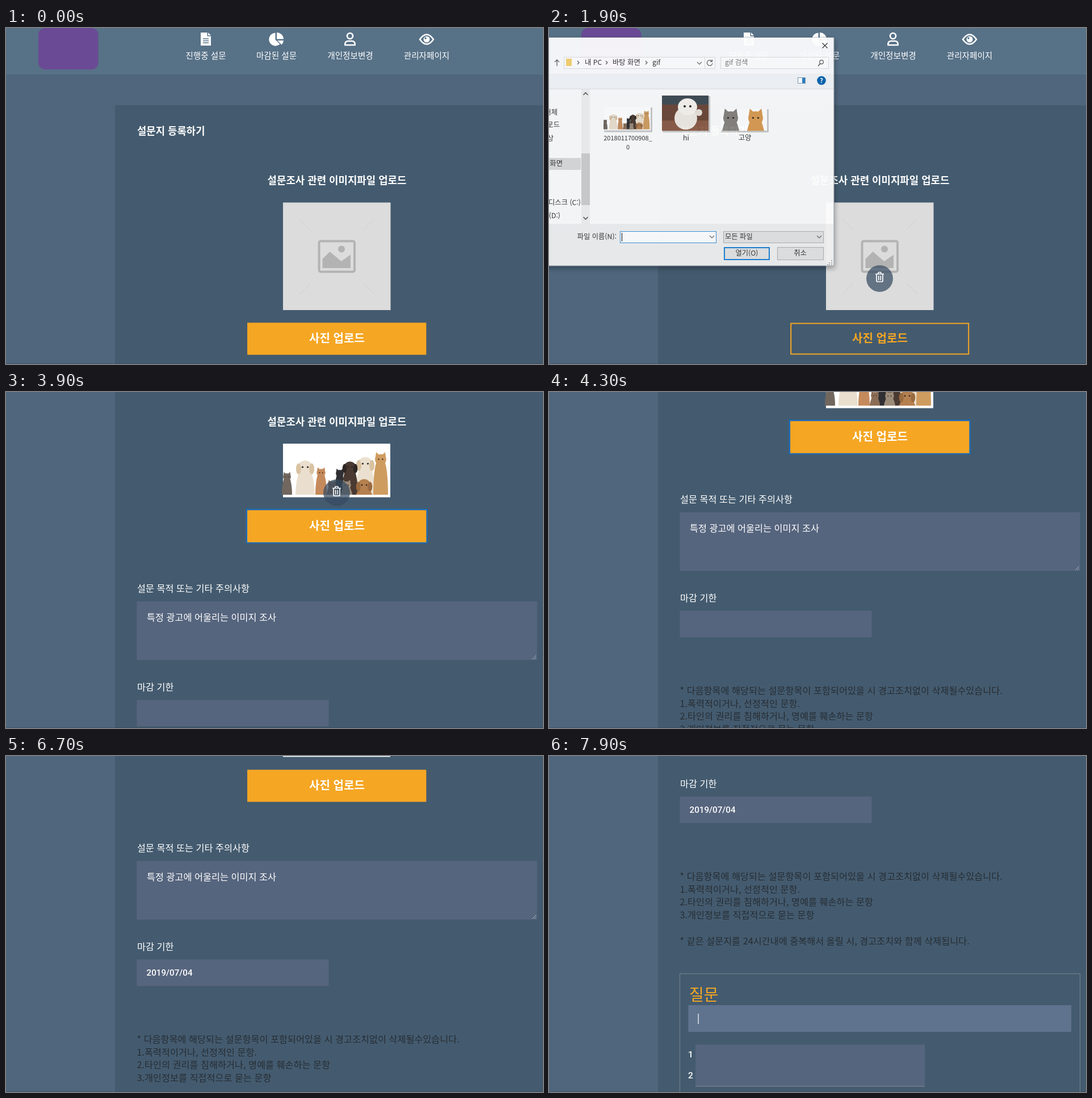
An HTML page that plays this animation: 946 by 592 pixels, repeating every 8000 ms.

```html
<!DOCTYPE html>
<html lang="ko">
<head>
<meta charset="utf-8">
<title>설문지 등록하기</title>
<style>
html, body { margin: 0; width: 100%; height: 100%; overflow: hidden; background: #4f667d; }
svg { display: block; width: 100vw; height: 100vh; }
text { font-family: "Noto Sans CJK KR", "Noto Sans CJK", sans-serif; }
.num { font-family: Roboto, "Noto Sans CJK KR", sans-serif; }
</style>
</head>
<body>
<svg id="stage" viewBox="0 0 946 592" xmlns="http://www.w3.org/2000/svg"></svg>
<script>
const LOOP = 8000, STEP = 100;
const ORANGE = '#f5a623', FIELD = '#56657e', FOCUS = '#60738e';

// Drawing helpers; text is placed by its vertical centre.
const rect = (x, y, w, h, fill, more = '') =>
  `<rect x="${x}" y="${y}" width="${w}" height="${h}" fill="${fill}" ${more}/>`;
const path = (d, fill, more = '') => `<path d="${d}" fill="${fill}" ${more}/>`;
const line = (d, color, width = 1, more = '') =>
  path(d, 'none', `stroke="${color}" stroke-width="${width}" ${more}`);
const oval = (x, y, rx, ry, fill) => `<ellipse cx="${x}" cy="${y}" rx="${rx}" ry="${ry}" fill="${fill}"/>`;
const text = (x, y, size, str, fill = '#fff', more = '') =>
  `<text x="${x}" y="${y + size * 0.365}" font-size="${size}" fill="${fill}" ${more}>${str}</text>`;
const group = (id, body, more = '') => `<g id="${id}" ${more}>${body}</g>`;
const MID = 'text-anchor="middle"', BOLD = 'font-weight="700"', NUM = 'class="num"';

// Sitting animal: pointed ears for cats, hanging ears for dogs.
function pet(x, top, w, color, earColor) {
  const r = w * 0.38, y = top + r;
  const ears = earColor
    ? oval(x - r * 0.9, y + r * 0.2, r * 0.35, r * 0.75, earColor) + oval(x + r * 0.9, y + r * 0.2, r * 0.35, r * 0.75, earColor)
    : path(`M${x - r} ${y}l${r * 0.2} ${-r * 1.3} ${r * 0.8} ${r * 0.7} ${r * 0.8} ${-r * 0.7} ${r * 0.2} ${r * 1.3}z`, color);
  return path(`M${x - r * 0.6} ${y}h${r * 1.2}Q${x + w / 2} ${top + w} ${x + w / 2} 90H${x - w / 2}Q${x - w / 2} ${top + w} ${x - r * 0.6} ${y}z`, color) +
    oval(x, y, r, r * 0.95, color) + ears +
    oval(x - r * 0.35, y - r * 0.05, r * 0.12, r * 0.12, '#2b2522') + oval(x + r * 0.35, y - r * 0.05, r * 0.12, r * 0.12, '#2b2522');
}

function petPhoto() {
  const pets = [
    [7, 52, 18, '#71675f'], [39, 29, 34, '#eadfce', '#d9c3a2'], [67, 44, 20, '#c58a5c'],
    [100, 46, 18, '#303034'], [145, 23, 34, '#ebe0cf', '#d8c29f'], [118, 31, 28, '#4a3a31', '#2e2623'],
    [172, 18, 26, '#cf9c60'], [86, 66, 18, '#8b6d55'], [112, 66, 20, '#9b8b79'], [143, 62, 30, '#b5804f', '#9a6a40']
  ];
  return rect(0, 0, 189, 94.5, '#fff') + pets.map(p => pet(...p)).join('');
}

function navBar() {
  const items = [[352, '진행중 설문'], [476.5, '마감된 설문'], [606.5, '개인정보변경'], [741, '관리자페이지']];
  return rect(0, 0, 946, 82, '#577187') +
    rect(57, 0, 105.5, 73, '#6a4a94', 'rx="12"') +
    items.map(([x, s]) => text(x, 48.5, 14.6, s, '#fff', MID)).join('') +
    path('M343 8h11.500v6.500h6.500V31H343z M356 8l5 5h-5z', '#fff') +
    line('M347 19h10M347 22.500h10M347 26h10', '#577187', 1.5) +
    path('M474.500 8.500a11.500 11.500 0 1 0 8 20l-8-8z M477 8a12 12 0 0 1 12 11.500h-12z M478 22h11a11 11 0 0 1-3.500 7.500z', '#fff') +
    `<circle cx="606" cy="14" r="5" fill="none" stroke="#fff" stroke-width="2.600"/>` +
    line('M597.300 30v-2q.5-5 5.500-5h6.400q5 0 5.500 5v2z', '#fff', 2.6, 'stroke-linejoin="round"') +
    line('M729 20q12-17 24 0q-12 17-24 0z', '#fff', 2.6, 'stroke-linejoin="round"') +
    oval(741, 20, 5.5, 5.5, '#fff') + oval(739, 18, 1.8, 1.8, '#577187');
}

function placeholder() {
  return rect(488, 307.5, 189.5, 189.5, '#dcdcdc') +
    line('M517 337l20 20M648 337l-18 18M517 469l18-18M650 469l-20-18', '#cfcfcf') +
    rect(551.5, 375.5, 62.5, 54, 'none', 'rx="3" stroke="#b3b3b3" stroke-width="4"') +
    oval(591, 389.5, 6, 6, '#b3b3b3') +
    path('M557.500 423v-16l13-13 20 17 16.500-11.500V423z', '#b3b3b3');
}

function trash() {
  return `<circle cx="582.500" cy="441.500" r="23.500" fill="rgba(55,75,98,.72)"/>` +
    line('M575 433.500h15M579.500 433l1-2.500h4l1 2.500M577 434v11q0 2 2 2h7q2 0 2-2v-11M580.700 436.500v8M584.300 436.500v8', '#fff', 1.7);
}

function uploadButton() {
  const label = fill => text(583, 546.5, 20.1, '사진 업로드', fill, `${MID} ${BOLD}`);
  return group('ring', rect(424, 518, 317.5, 58.5, 'none', 'stroke="#1a6dbd" stroke-width="2.500"')) +
    rect(426.2, 520.5, 313, 54, '#445b6f', `stroke="${ORANGE}" stroke-width="2"`) + label(ORANGE) +
    group('fill', rect(425.2, 519.5, 315, 56, ORANGE) + label('#fff'));
}

function calendar() {
  const colX = c => 251.5 + 32.7 * c, rowY = r => 903 + 30.2 * r;
  const cell = (id, c, r, fill) => group(id, rect(colX(c) - 16.5, rowY(r) - 15.5, 33, 30, fill, 'rx="4"'));
  let s = path('M236 818l10-9 10 9z', '#fff') + rect(230, 817, 238, 244, '#fff', 'rx="4"') +
    line('M230 856.500h238', '#ececec') +
    line('M252 833l-5 5 5 5M447 833l5 5-5 5', '#9c9c9c', 2) +
    text(349.5, 837, 14.3, '7월, <tspan fill="#9c9c9c">2019</tspan>', '#4a4a4a', `${MID} ${NUM}`) +
    cell('cell3', 3, 0, '#f8f8f8') + cell('cell11', 4, 1, '#f0f0f0') +
    cell('cell4', 4, 0, '#f0f0f0') + cell('picked', 4, 0, '#5cc4ef');
  [...'일월화수목금토'].forEach((d, i) => s += text(colX(i), 876, 10.5, d, '#ff9a19', MID));
  for (let i = 0; i < 35; i++) {
    const inside = i > 0 && i < 32, day = i === 0 ? 30 : i > 31 ? i - 31 : i;
    s += text(colX(i % 7), rowY(Math.floor(i / 7)), 14, day, inside ? '#4a4a4a' : '#dedede',
      `${MID} ${NUM} ${i === 4 ? 'id="day4"' : ''}`);
  }
  return group('calendar', s);
}

function form() {
  const rules = ['* 다음항목에 해당되는 설문항목이 포함되어있을 시 경고조치없이 삭제될수있습니다.',
    '1.폭력적이거나, 선정적인 문항.', '2.타인의 권리를 침해하거나, 명예를 훼손하는 문항',
    '3.개인정보를 직접적으로 묻는 문항', '', '* 같은 설문지를 24시간내에 중복해서 올릴 시, 경고조치와 함께 삭제됩니다.'];
  const answer = (n, y) => text(249.5, y + 17, 15.5, n, '#fff', `${MID} ${NUM} font-weight="500"`) +
    rect(258, y, 404, 36.5, FIELD) + rect(258, y + 36.5, 404, 1, '#858f9c');
  return text(231, 562, 16.3, '설문 목적 또는 기타 주의사항') +
    rect(230.500, 585, 705, 103, FIELD) +
    line('M927 687l7-7M931 687l3-3', '#aab2be') +
    text(248, 613, 16.3, '특정 광고에 어울리는 이미지 조사') +
    text(231, 736.5, 16.3, '마감 기한') +
    rect(230.500, 758.5, 338, 46.500, FIELD) +
    group('dateFocus', rect(229, 758, 340, 48, FOCUS, 'stroke="#8199b2" stroke-width="1.500"')) +
    group('dateCaret', rect(248, 773, 1, 18, '#fff')) +
    group('date', text(247.5, 781.5, 15.2, '2019/07/04', '#fff', `${NUM} font-weight="500"`)) +
    rules.map((s, i) => text(230.5, 899 + 22.75 * i, 16.3, s, '#262d34', 'font-weight="300"')).join('') +
    rect(230.5, 1070.5, 705, 500, 'none', 'stroke="#76828b"') +
    text(247, 1108, 28, '질문', ORANGE, 'font-weight="300"') +
    rect(245.500, 1126, 674.500, 47, FIELD) +
    group('ask', rect(245.500, 1126, 674.500, 47, FOCUS) + rect(262.500, 1141, 1.2, 18, '#fff')) +
    answer(1, 1195.5) + answer(2, 1232) + calendar();
}

function dialog() {
  const INK = '#333';
  const label = (x, y, s, more = '', fill = INK) => text(x, y, 12.3, s, fill, more);
  const thumb = (x, y, w, h, body) => rect(x + 1, y + 1, w + 2, h + 2, '#c9c9c9') +
    `<svg x="${x}" y="${y}" width="${w}" height="${h}" style="width:${w}px;height:${h}px">${body}</svg>`;
  const puppy = rect(0, 0, 82, 62, '#6b4638') + rect(0, 0, 82, 16, '#3f4a52') + rect(0, 44, 82, 18, '#8a5a45') +
    oval(42, 40, 20, 20, '#eee9e2') + oval(45, 20, 17, 15, '#f7f3ee') + oval(65, 30, 6, 6, '#e9e2da') +
    oval(40, 19, 2, 2, '#222') + oval(50, 19, 2, 2, '#222');
  const cats = rect(0, 0, 82, 39, '#fff') +
    `<g transform="translate(0 -34)">${pet(18, 38, 34, '#85817d')}${pet(62, 38, 34, '#d99b52')}</g>`;
  const chevron = (x, y) => line(`M${x - 4} ${y - 2}l4 4 4-4`, '#666', 1.2);
  const arrow = x => line(`M${x - 2} 58l3 3-3 3`, '#555', 1.2);
  const side = [[149, '개체', 15], [171, '로드', 19], [195, '상', 8], [239, '화면', 24], [308, '디스크 (C:)', 56], [331, '(D:)', 20]];
  return rect(-120, 17, 622, 402, '#f0f0f0', 'stroke="#8d979f" filter="url(#shade)"') +
    rect(-120, 17, 621, 64, '#fcfcfd') + rect(-120, 82, 621, 25, '#f3f5f8') + rect(-120, 107, 621, 1, '#dfe3e7') +
    rect(-120, 108, 621, 237, '#fcfcfc') +
    line('M481.500 26.500l9 9M490.500 26.500l-9 9', '#333', 1.2) +
    line('M14 67V56M10 60l4-4 4 4', '#666', 1.4) +
    rect(26.5, 51.5, 266, 20, '#fff', 'stroke="#dcdcdc"') + rect(30, 54, 10, 13, '#f7d070') + arrow(52) +
    label(63, 61, '내 PC') + arrow(102) + label(112, 61, '바탕 화면') + arrow(172) + label(182, 61, 'gif') +
    chevron(265, 62) + line('M274.500 52v19', '#dcdcdc') +
    line('M287 58.500a4.800 4.800 0 1 0 1 3.500M287.500 55.500v3.500h-3.500', '#666', 1.3) +
    rect(302.5, 51.5, 190, 20, '#fff', 'stroke="#dcdcdc"') + label(310, 61, 'gif 검색', '', '#777') +
    line('M474 67l4-4.500', '#555', 1.5) + `<circle cx="480" cy="60" r="3.300" fill="none" stroke="#555" stroke-width="1.200"/>` +
    rect(438.5, 87.5, 13, 10, '#fff', 'stroke="#7899b5"') + rect(446, 88, 5, 9, '#2b7fc3') +
    oval(480, 92.5, 7.8, 7.8, '#0a63ae') + text(480, 92.5, 11.5, '?', '#fff', `${MID} ${BOLD}`) +
    rect(-120, 229, 176, 21, '#d9d9d9') +
    side.map(([y, s, end]) => label(end, y, s, 'text-anchor="end"')).join('') +
    rect(57, 108, 15, 237, '#f0f0f0') + rect(57, 221, 15, 91, '#cdcdcd') +
    line('M60.500 118l4-4 4 4M60.500 333l4 4 4-4', '#555', 1.6) +
    group('hoverFile', rect(89.5, 114.5, 98, 105, '#e5f3ff')) +
    group('pickFile', rect(89.5, 114.5, 98, 105, '#cce8ff', 'stroke="#99d1ff"')) +
    thumb(96, 139, 83, 41.5, `<g transform="scale(.44)">${petPhoto()}</g>`) +
    thumb(199, 119, 82, 62, puppy) + thumb(302, 142, 82, 39, cats) +
    text(139, 194, 11, '2018011700908_', INK, MID) + text(139, 209.5, 11, '0', INK, MID) +
    label(241.5, 194, 'hi', MID) + label(345, 194, '고양', MID) +
    label(119, 368, '파일 이름(N):', 'text-anchor="end"') +
    rect(125.5, 358.5, 169, 20, '#fff', 'stroke="#3a92d8"') + chevron(287, 368) +
    group('nameCaret', rect(128, 361, 1, 15, '#000')) +
    group('name', text(128, 368, 10.9, '2018011700908_0', INK)) +
    rect(307.5, 358.5, 176, 20, '#e3e3e3', 'stroke="#b0b0b0"') + label(310, 368, '모든 파일') + chevron(476, 368) +
    rect(309, 387, 79, 21, '#e3e3e3', 'stroke="#1b80d4" stroke-width="2"') + label(348.5, 397, '열기(O)', MID) +
    rect(402.5, 386.5, 81, 22, '#e3e3e3', 'stroke="#b0b0b0"') + label(442.5, 397, '취소', MID) +
    path('M497 409h2v2h-2zM497 413h2v2h-2zM493 413h2v2h-2zM497 416h2v2h-2zM493 416h2v2h-2zM490 416h2v2h-2z', '#aaa');
}

const stage = document.getElementById('stage');
stage.innerHTML =
  `<defs><filter id="shade" x="-10%" y="-10%" width="120%" height="120%">
    <feDropShadow dx="1" dy="4" stdDeviation="5" flood-opacity=".35"/></filter></defs>` +
  rect(0, 0, 946, 592, '#4f667d') +
  group('page', navBar() + rect(192, 136, 754, 1600, '#445b6f') +
    text(231, 182, 17.8, '설문지 등록하기', '#fff', BOLD) +
    text(583, 268, 17.85, '설문조사 관련 이미지파일 업로드', '#fff', `${MID} ${BOLD}`) +
    group('empty', placeholder()) +
    group('photo', petPhoto(), 'transform="translate(488 307)"') +
    group('trash', trash()) +
    group('below', uploadButton()) + group('form', form())) +
  group('dialog', dialog()) +
  rect(0, 591, 946, 1, 'rgba(30,45,60,.3)');

const el = {};
stage.querySelectorAll('[id]').forEach(n => el[n.id] = n);

// Held steps: [time, value, time, value, ...]
const tracks = {
  scroll: [0, 0, 3700, 52, 3800, 134, 3900, 216, 4000, 276, 4100, 324, 4200, 358, 4300, 373,
    6700, 400, 6800, 466, 6900, 543, 7000, 605, 7100, 647, 7200, 675, 7300, 687],
  swap: [0, 0, 3300, 1],
  scale: [0, 0.96, 1900, 1, 2900, 0.985, 3000, 0.972, 3100, 0.96]
};
const fades = {
  trash: [0, 0, 700, 1, 4100, 0],
  fill: [0, 1, 900, 0.9, 1000, 0.7, 1100, 0.45, 1200, 0.25, 1300, 0.1, 1400, 0, 3300, 0.5, 3400, 1],
  ring: [0, 0, 1500, 1, 1600, 0, 2900, 1, 4900, 0],
  dialog: [0, 0, 1800, 0.5, 1900, 0.95, 2000, 1, 2900, 0.6, 3000, 0.25, 3100, 0.05, 3200, 0],
  hoverFile: [0, 0, 2400, 1, 2700, 0],
  pickFile: [0, 0, 2700, 1],
  nameCaret: [0, 1, 2400, 0],
  name: [0, 0, 2700, 1],
  dateFocus: [0, 0, 4900, 0.4, 5000, 0.8, 5100, 1, 6000, 0.6, 6100, 0.8, 6200, 1, 6400, 0.5, 6500, 0],
  dateCaret: [0, 0, 4900, 1, 5400, 0],
  date: [0, 0, 6000, 1],
  calendar: [0, 0, 4900, 0.3, 5000, 0.75, 5100, 1, 6700, 0],
  cell3: [0, 0, 5900, 1, 6000, 0],
  cell11: [0, 0, 5400, 0.5, 5500, 1, 5900, 0.4, 6000, 0],
  cell4: [0, 0, 5900, 1],
  picked: [0, 0, 6000, 0.6, 6100, 1],
  ask: [0, 0, 7900, 1]
};

function held(track, t) {
  let i = 0;
  while (i + 2 < track.length && track[i + 2] <= t) i += 2;
  return track[i + 1];
}

function show(node, alpha) {
  node.setAttribute('opacity', alpha);
  node.setAttribute('visibility', alpha > 0 ? 'visible' : 'hidden');
}

const shift = (node, y) => node.setAttribute('transform', `translate(0 ${y})`);

function draw(now) {
  const t = Math.floor((now % LOOP) / STEP) * STEP;
  const swap = held(tracks.swap, t), scale = held(tracks.scale, t);
  for (const id in fades) show(el[id], held(fades[id], t));
  show(el.empty, 1 - swap);
  show(el.photo, swap);
  shift(el.page, -held(tracks.scroll, t));
  shift(el.trash, -48 * swap);
  shift(el.below, -95 * swap);
  shift(el.form, 95 * (1 - swap));
  shift(el.calendar, 8 * (1 - held(fades.calendar, t)));
  el.day4.setAttribute('fill', t >= 6000 ? '#fff' : '#4a4a4a');
  el.dialog.setAttribute('transform', `translate(188 200) scale(${scale}) translate(-188 -200)`);
}

const start = performance.now();
function tick() {
  draw(performance.now() - start);
  requestAnimationFrame(tick);
}
tick();
</script>
</body>
</html>
```
